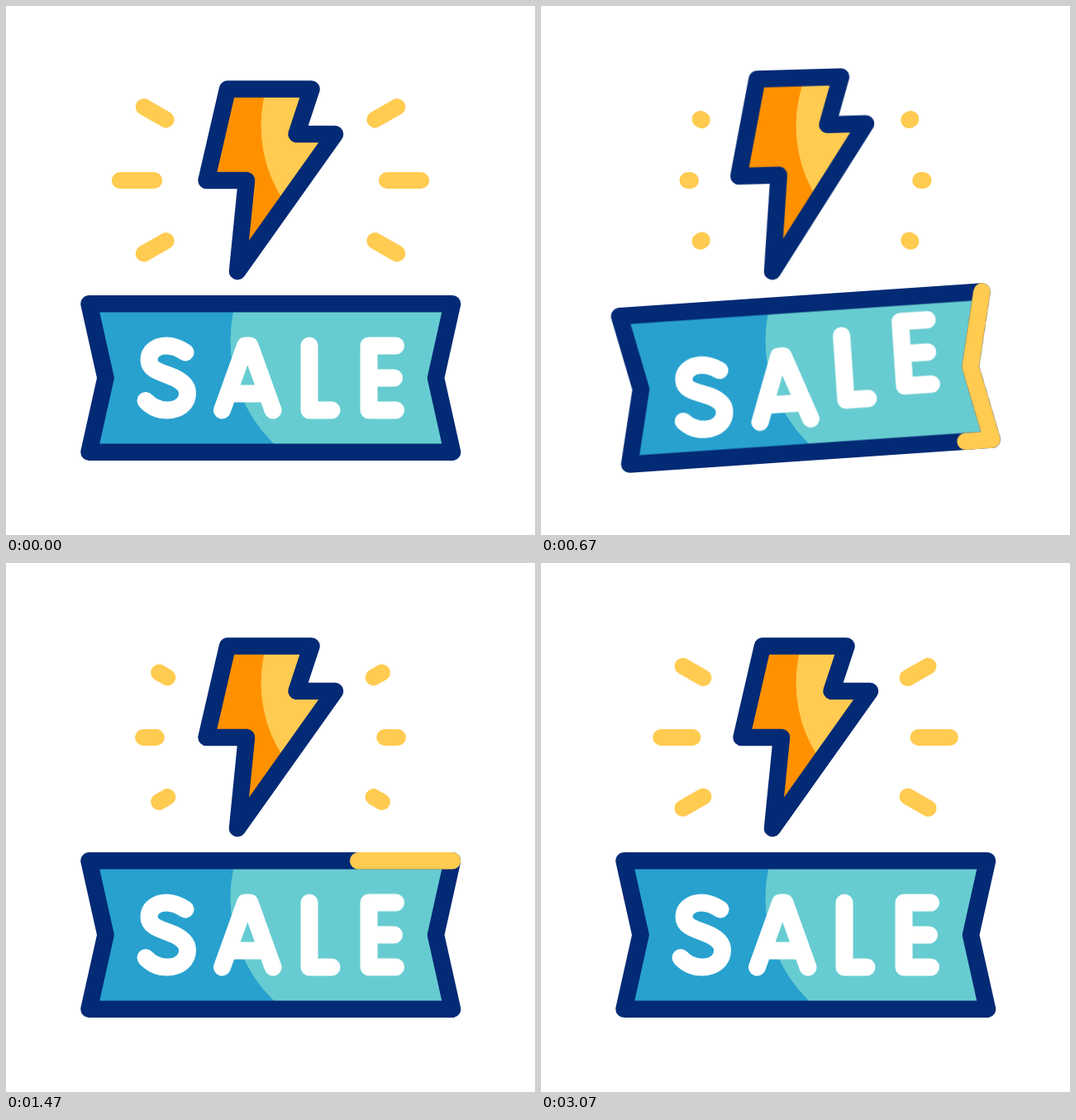
Animation of 640x640 px, one loop 3.1 s. Source, as an HTML page without scripts:

```html
<!DOCTYPE html>
<html lang="en">
<head>
<meta charset="utf-8">
<title>Flash sale</title>
<style>
@property --s { syntax: "<number>"; inherits: true; initial-value: 0; }
@property --e { syntax: "<number>"; inherits: true; initial-value: 0; }

:root {
  --navy: #032a75;
  --yellow: #ffcb50;
  --loop: 3.1s;
}
html, body {
  margin: 0;
  width: 100%;
  height: 100%;
  overflow: hidden;
  background: #fff;
}
svg { display: block; width: 640px; height: 640px; }

.line {
  fill: none;
  stroke: var(--navy);
  stroke-width: 20.5px;
  stroke-linecap: round;
  stroke-linejoin: round;
}

/* draws only the part of a path between --s and --e percent */
.trim {
  stroke-dasharray: calc((var(--e) - var(--s)) * 1px) 200px;
  stroke-dashoffset: calc(var(--s) * -1px);
}

.bolt {
  transform-origin: 280px 321px;
  animation: jump var(--loop) infinite;
}
.banner {
  transform-origin: 320px 450px;
  animation: rock var(--loop) ease-in-out infinite;
}
.edge {
  stroke: var(--yellow);
  animation: edge var(--loop) linear infinite;
}
.burst {
  stroke: var(--yellow);
  stroke-width: 20px;
  animation: burst var(--loop) linear calc(var(--at) - var(--loop)) infinite;
}
.letters path {
  stroke: #fff;
  stroke-width: 21px;
  animation: hop var(--loop) linear calc(var(--i) * .1s) infinite;
}

@keyframes jump {
  0% { transform: translate(0, 0) rotate(0deg) scaleY(1); animation-timing-function: ease-in; }
  8.71% { transform: translate(24.5px, -78px) rotate(0deg) scaleY(.878); animation-timing-function: ease-out; }
  11% { transform: translate(27px, -92px) rotate(0deg) scaleY(.87); animation-timing-function: ease-in-out; }
  18.7% { transform: translate(0, 0) rotate(0deg) scaleY(1); animation-timing-function: ease-in-out; }
  27.1% { transform: translate(0, 0) rotate(-6.3deg) scaleY(1.22); animation-timing-function: ease-in-out; }
  38.4%, 100% { transform: translate(0, 0) rotate(0deg) scaleY(1); }
}
@keyframes rock {
  0% { transform: rotate(0deg); }
  10.7% { transform: rotate(4deg); }
  21.6% { transform: rotate(-3.9deg); }
  32.2% { transform: rotate(3.3deg); }
  43.8%, 100% { transform: rotate(0deg); }
}
@keyframes hop {
  0%, 3.2% { transform: translateY(0); }
  5.5% { transform: translateY(-3px); }
  8.7% { transform: translateY(-11px); }
  11% { transform: translateY(-19.5px); }
  12.4% { transform: translateY(-22px); }
  13.9% { transform: translateY(-17px); }
  15.2% { transform: translateY(-9px); }
  18.4% { transform: translateY(10.6px); }
  20% { transform: translateY(15px); }
  21.6% { transform: translateY(15px); }
  24.8% { transform: translateY(1px); }
  27.4% { transform: translateY(-12px); }
  28.7% { transform: translateY(-15px); }
  30% { transform: translateY(-14px); }
  33.2% { transform: translateY(-7px); }
  36.5% { transform: translateY(-.5px); }
  38.7%, 100% { transform: translateY(0); }
}
@keyframes edge {
  0% { --s: 0; --e: 0; opacity: 0; }
  14.2% { --s: 0; --e: 0; opacity: 0; animation-timing-function: ease-in-out; }
  14.21% { opacity: 1; }
  27.1% { --s: 0; animation-timing-function: ease-in-out; }
  40% { --e: 100; }
  52.9% { --s: 100; opacity: 1; }
  52.91%, 100% { --s: 100; --e: 100; opacity: 0; }
}
@keyframes burst {
  0% { --s: 3.5; --e: 4; opacity: 1; }
  4.5% { --s: 0; animation-timing-function: ease-in; }
  10.64% { --s: 100; --e: 100; opacity: 1; }
  10.65%, 100% { --s: 100; --e: 100; opacity: 0; }
}
</style>
</head>
<body>
<svg viewBox="0 0 640 640" role="img" aria-label="SALE">
  <defs>
    <path id="bolt" vector-effect="non-scaling-stroke"
      d="M268 100.500H369.500L351.500 155H398L280 321L291 211H242.500Z"/>
    <path id="banner" d="M540 360.300L520 450L540 539.700H100.500L120.500 450L100.500 360.300Z"/>
    <g id="rays">
      <path class="trim" pathLength="100" d="M183.500 211H100"/>
      <path class="trim" pathLength="100" d="M456.500 211H540"/>
      <path class="trim" pathLength="100" d="M196.500 139L142 108"/>
      <path class="trim" pathLength="100" d="M443.500 139L498 108"/>
      <path class="trim" pathLength="100" d="M196.500 282.500L142 313.500"/>
      <path class="trim" pathLength="100" d="M443.500 282.500L498 313.500"/>
    </g>
    <clipPath id="in-bolt"><use href="#bolt" class="bolt"/></clipPath>
    <clipPath id="in-banner"><use href="#banner" class="banner"/></clipPath>
  </defs>

  <use href="#rays" class="line burst" style="--at: .66s"/>
  <use href="#rays" class="line burst" style="--at: 1.413s"/>
  <use href="#rays" class="line burst" style="--at: 2.167s"/>
  <use href="#rays" class="line burst" style="--at: 2.927s"/>

  <use href="#banner" class="banner" fill="#28a1ce"/>
  <g clip-path="url(#in-banner)"><circle cx="445.500" cy="405" r="174" fill="#67ccd1"/></g>
  <g class="banner">
    <use href="#banner" class="line"/>
    <path class="line trim edge" pathLength="100"
      d="M540 360.300L520 450L540 539.700H100.500L120.500 450L100.500 360.300H540"/>
    <g class="letters">
      <path class="line" style="--i: 0" d="M217 419C208 413 201 411 194 411C182 411 173 418 173 428C173 439 184 442 197 447C211 452 219.500 458 219.500 468.500C219.500 481 209 489 195 489C184 489 176 485 169 477.500"/>
      <path class="line" style="--i: 1" d="M261.500 489L289.500 411H295L323 489M270 469H314"/>
      <path class="line" style="--i: 2" d="M367 411V489H394"/>
      <path class="line" style="--i: 3" d="M471.500 411H439V489H471.500M439 450H469.500"/>
    </g>
  </g>

  <use href="#bolt" class="bolt" fill="#ff9100"/>
  <g clip-path="url(#in-bolt)"><circle cx="472.500" cy="145" r="164" fill="#ffcb50"/></g>
  <use href="#bolt" class="line bolt"/>
</svg>
</body>
</html>
```
